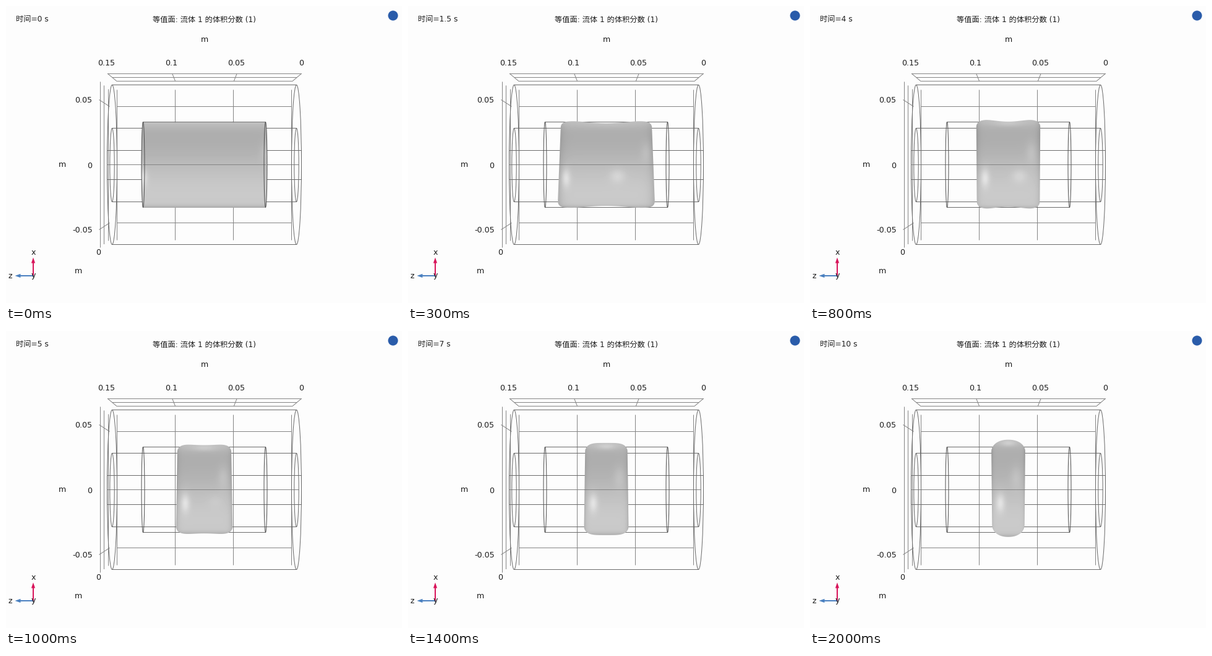
Animation, 640 px wide and 480 px high, one loop 2100 ms. Source, as a matplotlib script:

```python
import numpy as np
import matplotlib.pyplot as plt
from matplotlib.animation import FuncAnimation
from matplotlib.patches import Circle, Ellipse, Polygon

W, H, DPI = 640, 480, 100
FRAMES, STEP = 21, 0.5
PX = 72 / DPI
CX, CY = 320, 256
GRID, EDGE, INK = "#858585", "#6c6c6c", "#1c1c1c"
RED, BLUE = "#d8145a", "#4a80c0"

plt.rcParams["font.family"] = ["DejaVu Sans", "Noto Sans CJK JP"]
plt.rcParams["path.snap"] = False

fig = plt.figure(figsize=(W / DPI, H / DPI), dpi=DPI, facecolor="#fdfdfd")
ax = fig.add_axes([0, 0, 1, 1])
ax.set_xlim(-0.5, W - 0.5)
ax.set_ylim(H - 0.5, -0.5)
ax.axis("off")


def line(x0, y0, x1, y1, color=GRID, z=1, lw=1):
    ax.plot([x0, x1], [y0, y1], color=color, lw=lw * PX, zorder=z,
            solid_capstyle="butt")


def ring(x, rx, y0, y1, color=EDGE, z=1):
    ax.add_patch(Ellipse((x, (y0 + y1) / 2), 2 * rx, y1 - y0, fill=False,
                         ec=color, lw=PX, zorder=z))


def tube(x0, x1, rx, y0, y1, color=EDGE, z=1):
    """Cylinder seen from the side: two long edges and two end rings."""
    for y in (y0, y1):
        line(x0, y, x1, y, EDGE)
    for x in (x0, x1):
        ring(x, rx, y0, y1, color, z)


def label(x, y, s, ha="center", size=12.6):
    return ax.text(x, y, s, ha=ha, va="baseline", fontsize=size * PX,
                   color=INK, zorder=5)


def draw_scene():
    for i in range(4):
        line(179 + 94 * i, 135, 179 + 94 * i, 378)
    for y in (CY - 94, CY + 94):
        line(179, y, 461, y)
    line(163, CY, 473, CY)

    # Rulers recede towards the back grid
    for i in range(3):
        line(164 + 7.5 * i, 109 + 6 * i, 477 - 7.5 * i, 109 + 6 * i)
        x = np.floor(152 + 6.7 * i)
        line(x, 122 + 6 * i, x, 390 - 5.5 * i)
    for i in range(4):
        line(163.5 + 104.6 * i, 108.5, 179 + 94.3 * i, 121.5)
    line(150, 151, 167, 162)
    line(150, 361, 167, 350)

    tube(171, 469, 8, 127, 385)
    tube(171, 469, 3.7, 197, 316)
    tube(221, 419, 2.5, 187, 325, "#505050", 4)
    for y in (233, 280):
        line(163, y, 477, y, EDGE)
    for x in (163, 477):
        line(x, 233, x, 280, EDGE)

    for i, s in enumerate(("0.15", "0.1", "0.05", "0")):
        label(161.5 + 105.2 * i, 96, s)
    for i, s in enumerate(("0.05", "0", "-0.05")):
        label(139, 156 + 105 * i, s, "right")
    label(148.5, 401, "0")
    for x, y in ((CX, 57), (90, 260), (117, 431)):
        label(x, y, "m")

    # Orientation triad
    line(43.5, 436, 43.5, 413, RED, 3, 2)
    line(44, 435.5, 22, 435.5, BLUE, 3, 2)
    ax.add_patch(Polygon([(43.5, 406), (40.4, 415), (46.6, 415)], fc=RED, lw=0, zorder=3))
    ax.add_patch(Polygon([(14, 435.5), (23, 432.4), (23, 438.6)], fc=BLUE, lw=0, zorder=3))
    for x, y, s in ((44, 401, "x"), (6, 439, "z"), (44, 438, "y")):
        label(x, y, s)

    ax.add_patch(Circle((625, 15), 8, fc="#2a5caa", lw=0, zorder=3))
    label(CX, 25, "等值面: 流体 1 的体积分数 (1)", size=12.2)


class Blob:
    """Fluid column that shortens, dents and then rounds off at time t."""

    def __init__(self, t):
        decay = np.exp(-t / 4.5)
        grow = (t / 10) ** 1.5
        self.t = t
        self.half = 18 + 81 * decay
        self.dent = 4.8 * np.exp(-((t - 2.7) / 1.9) ** 2) * min(t, 1)
        self.top = 187.7 - 12.5 * grow - 0.4 * self.dent
        self.bottom = 325.3 + 7 * grow
        self.shoulder = 11 * (1 - np.exp(-2 * t)) + 8 * (t / 10) ** 3
        self.power = 20.5 * decay
        self.bulge = 2.5 * np.exp(-5 * t)
        swing = np.sin(np.pi * (1.45 * np.log(t + 0.01) - 0.09))
        self.taper = 2.8 * swing * np.exp(-t / 8) * min(t, 1)

    def outline(self):
        u = np.sin(np.linspace(-np.pi / 2, np.pi / 2, 181))
        drop = self.shoulder * (1 - np.sqrt(1 - np.abs(u) ** self.power))
        drop = drop + self.dent * np.clip(1 - (u / 0.75) ** 2, 0, 1) ** 2
        y_top, y_bot = self.top + drop, self.bottom - drop
        v = np.linspace(-1, 1, 61)
        y_side = y_top[0] + (v + 1) / 2 * (y_bot[0] - y_top[0])
        x_side = self.half + self.taper * v + self.bulge * np.sqrt(1 - v ** 2)
        x = np.concatenate([u * (self.half - self.taper), x_side,
                            u[::-1] * (self.half + self.taper), -x_side[::-1]])
        y = np.concatenate([y_top, y_side, y_bot[::-1], y_side[::-1]])
        return np.column_stack([CX + x, y])

    def shade(self):
        v = (Y - self.top) / (self.bottom - self.top)
        u = np.clip(np.abs(X - CX) / self.half, 0, 1)
        g = 0.735 - 0.055 * np.cos(np.pi * (v - 0.16) / 0.69)
        g += 0.05 * np.exp(-(v / 0.08) ** 2)
        g -= 0.08 * np.exp(-((1 - v) / 0.03) ** 2)
        g -= 0.09 * min(self.t, 1) * u ** 12
        inset = self.half - 14 * (1 - np.exp(-self.t))
        g += 0.12 * spot(CX - inset, 277, 7, 15)
        g += 0.05 * spot(CX + inset, 235, 9, 18)
        g += 0.022 * self.dent * spot(338, 274, 12, 11)
        g += 0.08 * min(self.t / 6, 1) * spot(CX, self.top + 6, self.half * 0.45, 5)
        return np.clip(g, 0, 1)


X, Y = np.meshgrid(np.arange(W), np.arange(H))


def spot(x, y, sx, sy):
    return np.exp(-((X - x) / sx) ** 2 - ((Y - y) / sy) ** 2)


draw_scene()
clock = label(15.5, 25, "", "left", 12.2)
fill = ax.imshow(np.ones((H, W)), cmap="gray", vmin=0, vmax=1, zorder=2,
                 aspect="auto", interpolation="nearest")
mask = Polygon([(0, 0), (1, 0), (1, 1)], transform=ax.transData)
midline, = ax.plot([], [], color="#606060", alpha=0.6, lw=PX, zorder=3)


def update(i):
    t = i * STEP
    blob = Blob(t)
    mask.set_xy(blob.outline())
    fill.set_data(blob.shade())
    fill.set_clip_path(mask)
    midline.set_data([CX - blob.half, CX + blob.half], [CY, CY])
    clock.set_text(f"时间={t:g} s")
    return fill, midline, clock


anim = FuncAnimation(fig, update, frames=FRAMES, interval=100, repeat=True,
                     repeat_delay=0, blit=False)
plt.show()
```
